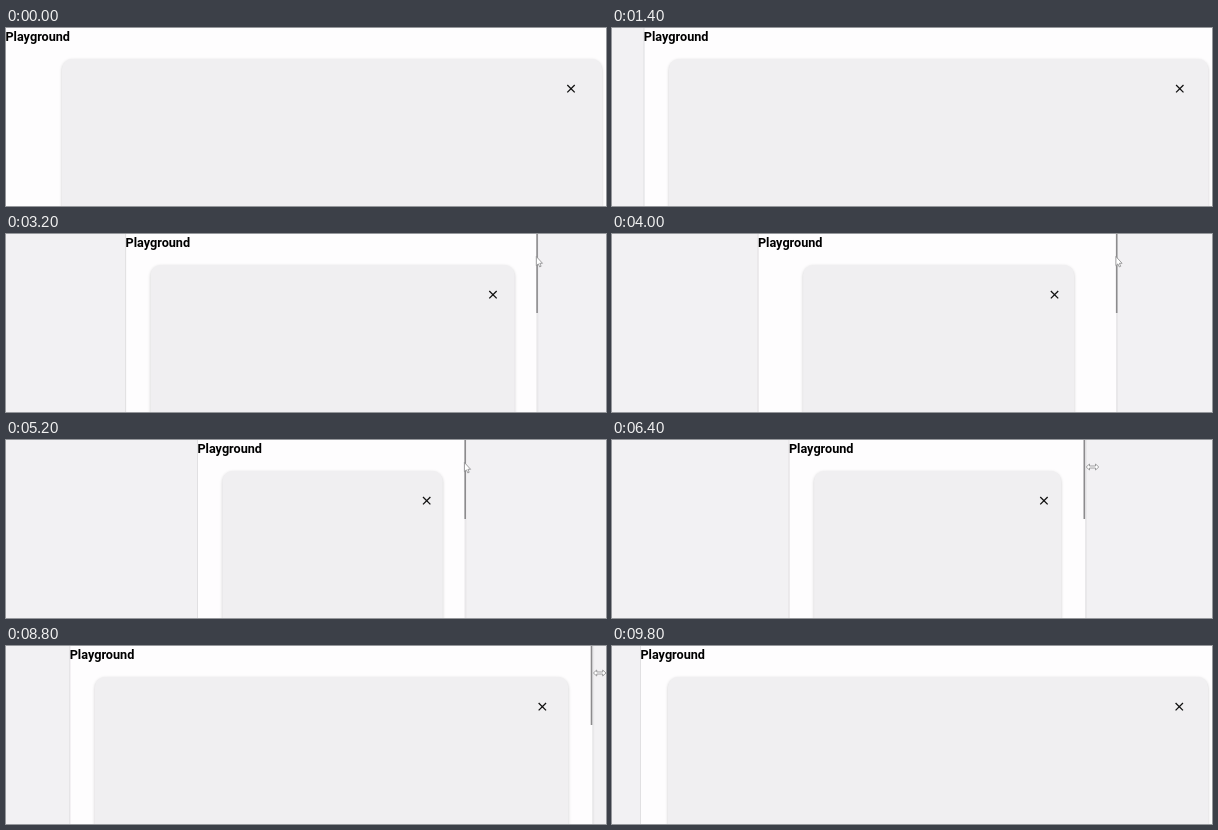
Recreate the animation shown at these times as an HTML page. Size 600 by 178 pixels, loop 10 s.

```html
<!DOCTYPE html>
<html lang="en">
<head>
<meta charset="utf-8">
<title>Responsive sheet</title>
<style>
  html, body { margin: 0; width: 100%; height: 100%; overflow: hidden; background: #f2f1f3; }
  svg { display: block; width: 600px; height: 178px; }
  text { font: 700 12.66px Roboto, Arial, sans-serif; }
  #card { filter: drop-shadow(0 1px 1.5px rgba(0, 0, 0, .2)); }
</style>
</head>
<body>
<svg viewBox="0 0 600 178">
  <rect width="600" height="178" fill="#f2f1f3"/>
  <rect id="page" y="-2" height="184" fill="#fefdfe"/>
  <rect id="border" y="0" width="1" height="178" fill="#e1e0e2"/>
  <rect id="track" y="0" width="2" height="178" fill="#e9e8ea"/>
  <rect id="thumb" y="0" width="1.6" height="79" fill="#8c8b8d"/>
  <text id="title" y="13">Playground</text>
  <rect id="card" y="31" height="180" rx="10" fill="#f0eff1"/>
  <path id="close" d="M-3.7-3.7 3.7 3.7M3.7-3.7-3.7 3.7" stroke="#111" stroke-width="1.3"/>
  <path id="resize" d="M-6.3 0-3-3V-1H3V-3L6.3 0 3 3V1H-3V3Z" fill="#fff" stroke="#8a898b" stroke-width=".8"/>
  <path id="arrow" d="M0 0V9.2L2 7.4 3.4 10.4 4.8 9.8 3.5 6.8H6.2Z" fill="#fff" stroke="#8a898b" stroke-width=".8"/>
</svg>
<script>
const LOOP = 10000, STEP = 200, TURN = 5600;
const SPAN = 651;              // left edge + right edge of the centred page
const BREAKPOINT = 405, WIDE = 540, NARROW = 271;

// [time, left edge of the page]
const path = [
  [0, 0], [700, 0], [1800, 51], [2400, 85], [3000, 113.5], [4000, 146.5],
  [4200, 155.5], [5200, 192], [5500, 197], [5800, 196], [6400, 177.5],
  [6600, 170], [7800, 105.7], [9000, 56], [9800, 29], [10000, 29]
];

const el = id => document.getElementById(id);
const set = (id, attrs) => {
  for (const key in attrs) el(id).setAttribute(key, attrs[key]);
};
const place = (id, x, y) => set(id, { transform: `translate(${x} ${y})` });
const show = (id, on) => set(id, { visibility: on ? 'visible' : 'hidden' });

function leftAt(t) {
  const i = path.findIndex(p => p[0] > t);
  const [t0, a] = path[i - 1], [t1, b] = path[i];
  return a + (b - a) * (t - t0) / (t1 - t0);
}

function draw(t) {
  const left = leftAt(t), right = SPAN - left, width = right - left;
  const shrinking = t < TURN;

  set('page', { x: left, width });
  set('border', { x: left - 1 });
  set('track', { x: right - .5 });
  set('thumb', { x: shrinking ? right - .6 : right - 2 });
  set('title', { x: left - .6 });

  const limit = width < BREAKPOINT ? NARROW : WIDE;
  const cardWidth = Math.min(limit, width - (shrinking ? 46.8 : 49));
  const centre = cardWidth === WIDE ? 326 : shrinking ? 326.6 : 325.6;
  const cardRight = centre + cardWidth / 2;
  set('card', { x: cardRight - cardWidth, width: cardWidth });
  place('close', cardRight - 5.6 - .039 * width, 60.7);

  const pointing = t >= 2800 && t < TURN;
  show('arrow', pointing);
  show('resize', !pointing);
  place('arrow', right - .6, 22.5);
  place('resize', right + (shrinking ? 5.5 : 7), 27);
}

function tick(now) {
  draw(Math.floor(now % LOOP / STEP) * STEP);
  requestAnimationFrame(tick);
}
draw(0);
requestAnimationFrame(tick);
</script>
</body>
</html>
```
